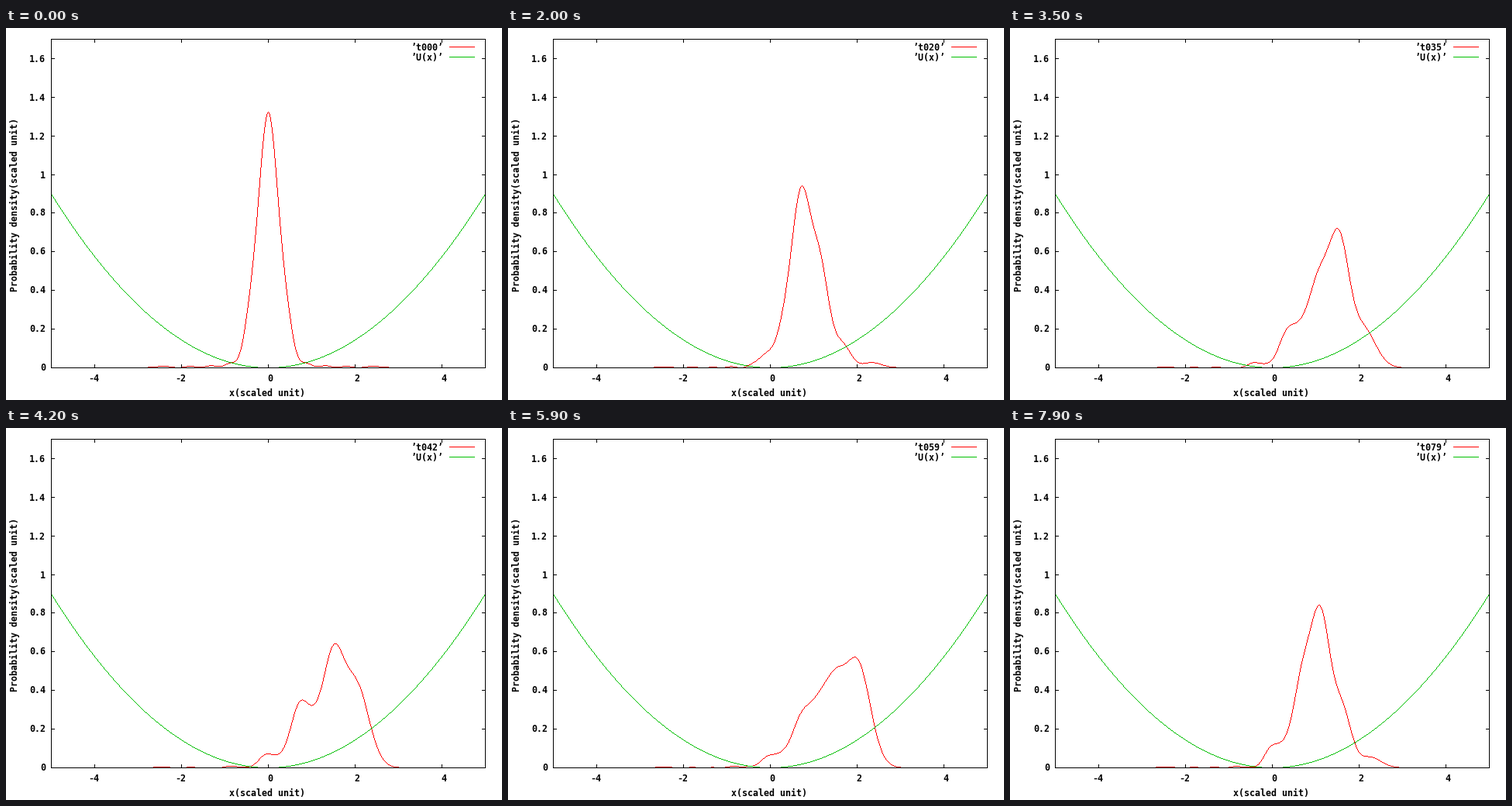
Recreate the animation shown at these times as a matplotlib script. Size 640 by 480 pixels, loop 8000 ms.

```python
import numpy as np
import matplotlib.pyplot as plt
from matplotlib.animation import FuncAnimation

plt.rcParams.update({
    "font.family": "DejaVu Sans Mono",
    "font.weight": "bold",
    "font.size": 8.4,
    "path.simplify": False,
})

W, H, DPI = 640, 480, 100
FRAMES, INTERVAL = 80, 100

# Plot box and scales in pixels
LEFT, RIGHT, TOP, BOTTOM = 58, 618, 14, 438
X0, XS = 338, 56
YS = (BOTTOM - TOP) / 1.7
TICK = 4
PX = 72 / DPI

# Squeezed coherent state, cut off after the level LEVELS - 1
LEVELS = 11
LENGTH = 0.58       # oscillator length
ALPHA = 2.03        # displacement
SQUEEZE = 0.2764    # exp(-2r)
OMEGA = 0.03        # phase per frame


def level_weights():
    b = SQUEEZE
    w = np.zeros(LEVELS)
    w[0] = b**0.25 * np.sqrt(2 / (1 + b)) * np.exp(-b * ALPHA**2 / (1 + b))
    for n in range(LEVELS - 1):
        below = (1 - b) * np.sqrt(n) * w[n - 1] if n else 0
        w[n + 1] = (2 * b * ALPHA * w[n] + below) / ((1 + b) * np.sqrt(n + 1))
    return w


def eigenfunctions(q):
    phi = [np.pi**-0.25 * np.exp(-q**2 / 2)]
    phi.append(np.sqrt(2) * q * phi[0])
    for n in range(1, LEVELS - 1):
        phi.append(np.sqrt(2 / (n + 1)) * q * phi[n]
                   - np.sqrt(n / (n + 1)) * phi[n - 1])
    return np.array(phi)


cols = np.arange(LEFT, RIGHT + 1)
x = (cols - X0) / XS
modes = level_weights()[:, None] * eigenfunctions(x / LENGTH)
levels = np.arange(LEVELS)


def density(i):
    phase = np.exp(1j * levels * (np.pi / 2 - OMEGA * i))
    return np.abs(phase @ modes)**2 / LENGTH


def row(v):
    return BOTTOM - np.round(YS * v)


def pixel_runs(values):
    """One upright run of whole pixels per column, joined halfway."""
    y = row(values)
    mid = (y[:-1] + y[1:]) / 2 + 0.25
    ends = np.array([y, np.r_[y[0], mid], np.r_[mid, y[-1]]])
    lo, hi = np.ceil(ends.min(axis=0)), np.floor(ends.max(axis=0))
    gap = np.full_like(y, np.nan)
    return np.column_stack([lo + 0.2, hi + 0.8, gap]).ravel()


fig = plt.figure(figsize=(W / DPI, H / DPI), dpi=DPI, facecolor="white")
ax = fig.add_axes([0, 0, 1, 1])
ax.set_xlim(0, W)
ax.set_ylim(H, 0)
ax.axis("off")


def stroke(xs, ys, color, z, width=1, cap="projecting"):
    line, = ax.plot(xs, ys, color=color, lw=width * PX, antialiased=False,
                    snap=False, solid_capstyle=cap, zorder=z)
    return line


def segment(xa, ya, xb, yb, color="black"):
    stroke([xa + 0.5, xb + 0.5], [ya + 0.5, yb + 0.5], color, 4)


def curve(values, color, z):
    return stroke(np.repeat(cols + 0.5, 3), pixel_runs(values), color, z,
                  width=0.5, cap="butt")


def label(px, py, s, ha="center", **kw):
    return ax.text(px, py, s, ha=ha, va="baseline", color="black", zorder=5, **kw)


# Border, ticks and tick labels
for y in (TOP, BOTTOM):
    segment(LEFT, y, RIGHT, y)
for c in (LEFT, RIGHT):
    segment(c, TOP, c, BOTTOM)

for v in (-4, -2, 0, 2, 4):
    c = X0 + XS * v // 2 * 2 // 2 if False else X0 + XS * v
    segment(c, BOTTOM, c, BOTTOM - TICK)
    segment(c, TOP, c, TOP + TICK)
    label(c + (-0.5 if v < 0 else 3), 456, f"{v}")

for k in range(9):
    r = row(k / 5)
    segment(LEFT, r, LEFT + TICK, r)
    segment(RIGHT, r, RIGHT - TICK, r)
    label(51, r + 4.5, f"{k / 5:g}", ha="right")

label(337, 475, "x(scaled unit)")
label(15.5, 228, "Probability density(scaled unit)",
      rotation=90, rotation_mode="anchor")

# Legend
RED, GREEN = "#ff0000", "#00c000"
name = label(565, 29, "", ha="right")
label(565, 42, "’U(x)’", ha="right")
segment(572, 24, 604, 24, RED)
segment(572, 37, 604, 37, GREEN)

# Curves
packet = curve(density(0), RED, 2)
curve(0.036 * x**2, GREEN, 3)


def update(i):
    packet.set_ydata(pixel_runs(density(i)))
    name.set_text(f"’t{i:03d}’")
    return packet, name


anim = FuncAnimation(fig, update, frames=FRAMES, interval=INTERVAL,
                     repeat=True, repeat_delay=0, blit=False)
plt.show()
```
